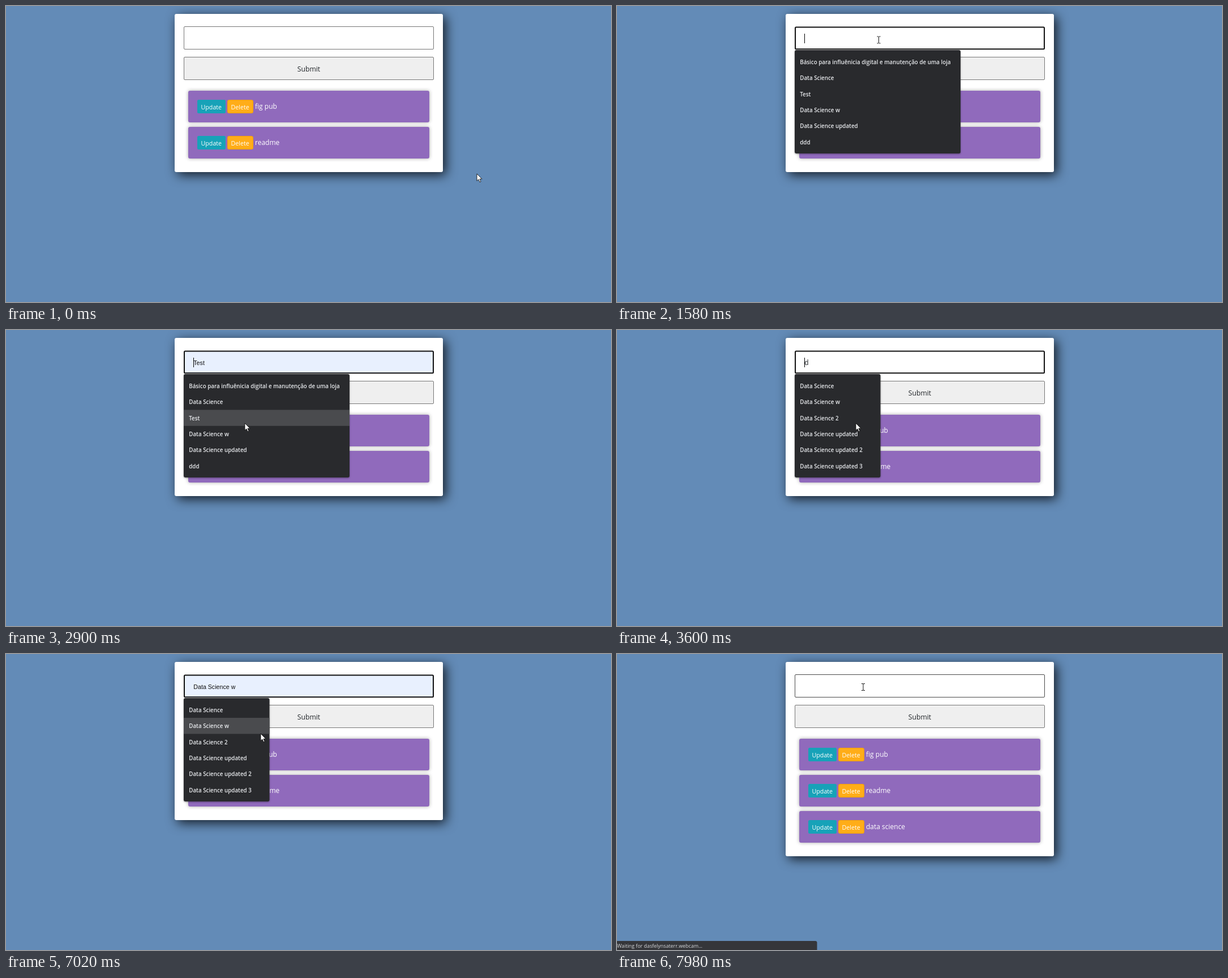
These frames come from a looping animation (1069x524 px, 8 s). An HTML page:

```html
<!DOCTYPE html>
<html lang="en">
<head>
<meta charset="utf-8">
<title>Task list</title>
<style>
  html, body { margin: 0; width: 100%; height: 100%; overflow: hidden; background: #638bb7; }
  svg { display: block; width: 100vw; height: 100vh; }
  text { font: 12px "Open Sans", "Noto Sans", sans-serif; fill: #212529; white-space: pre; }
  .card { fill: #fff; filter: drop-shadow(5px 5px 10px rgba(0, 0, 0, .8)); }
  .item { fill: #906abc; filter: drop-shadow(0 0 3px rgba(0, 0, 0, .35)); }
  .label { fill: #fff; }
  .small { fill: #fff; font-size: 10.7px; }
  .panel { fill: #292a2d; filter: drop-shadow(0 1px 1.5px rgba(0, 0, 0, .4)); }
  .option { fill: #e8eaed; font-size: 9.8px; font-weight: 600; }
  .note { fill: #d6d8db; font-size: 8.9px; }
  .preview { font: 10.67px "Liberation Sans", Arial, sans-serif; fill: #111; }
</style>
</head>
<body>
<script>
const LOOP = 8000;
const PHRASE = 'data science';
const TEXT_X = 331.3;
const ROW_TOP = 84.6, ROW_H = 28.4;

// Pointer moves: first step, last step, number of steps, destination
const START = [832, 297];
const MOVES = [
  [70, 890, 12, 462.5, 60],
  [2590, 2670, 2, 459, 64.5],
  [2750, 2900, 3, 422, 165],
  [6870, 7020, 3, 450, 141],
  [7100, 7340, 4, 505, 109],
  [7830, 7980, 3, 435, 58.5]
];
// Time at which each letter of the phrase appears
const KEYS = [3600, 3690, 3770, 3920, 4380, 4620, 4940, 5010, 5080, 5310, 5770, 5860];
const CARET_ON = [[1510, 2040], [2590, 3300], [3600, 6410]];
const FOCUS = 1510, OPEN = 1580, CLICK = 7420, WAIT = 7580, RELOAD = 7830;

const WIDE = ['Básico para influênicia digital e manutenção de uma loja', 'Data Science', 'Test',
  'Data Science w', 'Data Science updated', 'ddd'];
const NARROW = ['Data Science', 'Data Science w', 'Data Science 2', 'Data Science updated',
  'Data Science updated 2', 'Data Science updated 3'];

function add(parent, tag, attrs, content = '') {
  const node = document.createElementNS('http://www.w3.org/2000/svg', tag);
  for (const name in attrs) node.setAttribute(name, attrs[name]);
  node.textContent = content;
  return parent.appendChild(node);
}
const group = parent => add(parent, 'g', {});
const rect = (parent, x, y, width, height, attrs) => add(parent, 'rect', { x, y, width, height, ...attrs });
const text = (parent, x, y, content, attrs) => add(parent, 'text', { x, y, ...attrs }, content);
const show = (node, on) => { node.style.display = on ? '' : 'none'; };
const within = (t, from, to) => t >= from && t < to;

const svg = add(document.body, 'svg', { viewBox: '0 0 1069 524', preserveAspectRatio: 'none' });
rect(svg, 0, 0, 1069, 524, { fill: '#638bb7' });
const card = rect(svg, 298, 14, 474, 280, { rx: 3, class: 'card' });

const field = rect(svg, 314.5, 36.5, 441, 40, { rx: 1.5 });
const typed = text(svg, TEXT_X, 62, '');
const preview = text(svg, TEXT_X, 61.7, '', { class: 'preview' });
const caret = rect(svg, 331, 49, 1, 17, { fill: '#000' });

const button = rect(svg, 314.5, 90.5, 441, 40, { rx: 1.5, stroke: '#767676' });
text(svg, 535, 115.5, 'Submit', { 'text-anchor': 'middle', style: 'font-size:12.2px' });

function listItem(name, index) {
  const g = add(svg, 'g', { transform: `translate(0 ${index * 64})` });
  rect(g, 322, 150, 426, 56, { rx: 3, class: 'item' });
  rect(g, 338, 166, 50, 24, { rx: 2.5, fill: '#17a2b8' });
  rect(g, 391.5, 166.5, 45, 23, { rx: 2.5, fill: '#ffad18', stroke: '#f79f0a' });
  text(g, 344.5, 182.5, 'Update', { class: 'small' });
  text(g, 397.5, 182.5, 'Delete', { class: 'small' });
  text(g, 440, 182, name, { class: 'label' });
  return g;
}
const newItem = ['fig pub', 'readme', PHRASE].map(listItem)[2];

function menu(options, width) {
  const node = group(svg);
  rect(node, 314, 78, width, 183, { rx: 3, class: 'panel' });
  const mark = rect(node, 314, ROW_TOP, width, ROW_H, { fill: '#4a4b4e' });
  options.forEach((name, i) => text(node, 323.2, 102.7 + i * ROW_H, name, { class: 'option' }));
  return { node, mark, options, width };
}
const wideMenu = menu(WIDE, 293);
const narrowMenu = menu(NARROW, 151.5);

const tooltip = group(svg);
rect(tooltip, 469, 71, 109, 20, { fill: '#292a2d' });
text(tooltip, 475.5, 84.5, 'Please fill out this field.', { class: 'note' });

const status = group(svg);
rect(status, -4, 508, 357.5, 20, { rx: 3, fill: '#35363a' });
text(status, 0, 520.3, 'Waiting for dasfelynsaterr.webcam...', { class: 'note' });

const arrow = add(svg, 'path', {
  d: 'M0 0V12.6L2.9 9.9 5 14.7 7 13.9 5 9.2H9Z', fill: '#fff', stroke: '#000', 'stroke-width': .8
});
const beam = add(svg, 'path', {
  d: 'M-3 -6H-1L0 -5.3 1 -6H3M0 -5.3V5.3M-3 6H-1L0 5.3 1 6H3', fill: 'none', stroke: '#111'
});

function pointerAt(t) {
  let [x, y] = START;
  for (const [from, to, steps, endX, endY] of MOVES) {
    if (t < from) break;
    const step = Math.floor((t - from) / (to - from) * (steps - 1) + 1e-6) + 1;
    const p = Math.min(1, step / steps);
    const eased = p * p * (3 - 2 * p);
    x += (endX - x) * eased;
    y += (endY - y) * eased;
  }
  return [x, y];
}

function renderMenu(m, open, tracking, x, y) {
  show(m.node, open);
  const row = Math.floor((y - ROW_TOP) / ROW_H);
  const hit = open && tracking && x < 314 + m.width && row >= 0 && row < m.options.length;
  show(m.mark, hit);
  if (!hit) return '';
  m.mark.setAttribute('y', ROW_TOP + row * ROW_H);
  return m.options[row];
}

function render(t) {
  const [x, y] = pointerAt(t);
  const focused = within(t, FOCUS, CLICK);
  const inColumn = x > 314 && x < 756;
  const overField = inColumn && y > 36 && y < 77;
  const overButton = inColumn && y > 90 && y < 131;

  const wideOpen = within(t, OPEN, KEYS[0]);
  const narrowOpen = within(t, KEYS[0], CLICK);
  const hovered = renderMenu(wideMenu, wideOpen, t >= 2590, x, y)
    || renderMenu(narrowMenu, narrowOpen, t >= 6870, x, y);
  if (wideOpen) show(narrowMenu.node, false);

  const box = focused ? [315, 37.5, 440, 38.8, 2] : [314.5, 36.5, 441, 40, 1];
  ['x', 'y', 'width', 'height', 'stroke-width'].forEach((name, i) => field.setAttribute(name, box[i]));
  field.setAttribute('stroke', focused ? '#101010' : overField ? '#4a4a4a' : '#767676');
  field.setAttribute('fill', hovered ? '#e8f0fe' : '#fff');
  button.setAttribute('fill', overButton && !wideOpen && !(narrowOpen && x < 465) ? '#e5e5e5' : '#efefef');

  const count = t < RELOAD ? KEYS.filter(key => key <= t).length : 0;
  typed.textContent = PHRASE.slice(0, count);
  preview.textContent = hovered;
  const advance = count ? typed.getComputedTextLength() : 0;
  caret.setAttribute('x', Math.floor(TEXT_X + advance));
  show(typed, !hovered);
  show(caret, CARET_ON.some(([from, to]) => within(t, from, to)));

  card.setAttribute('height', t < RELOAD ? 280 : 344);
  show(newItem, t >= RELOAD);
  show(tooltip, within(t, 1260, FOCUS));
  show(status, t >= WAIT);

  show(beam, overField);
  show(arrow, !overField);
  (overField ? beam : arrow).setAttribute('transform', `translate(${x} ${y})`);
}

const begin = performance.now();
function tick() {
  render((performance.now() - begin) % LOOP);
  requestAnimationFrame(tick);
}
tick();
</script>
</body>
</html>
```
